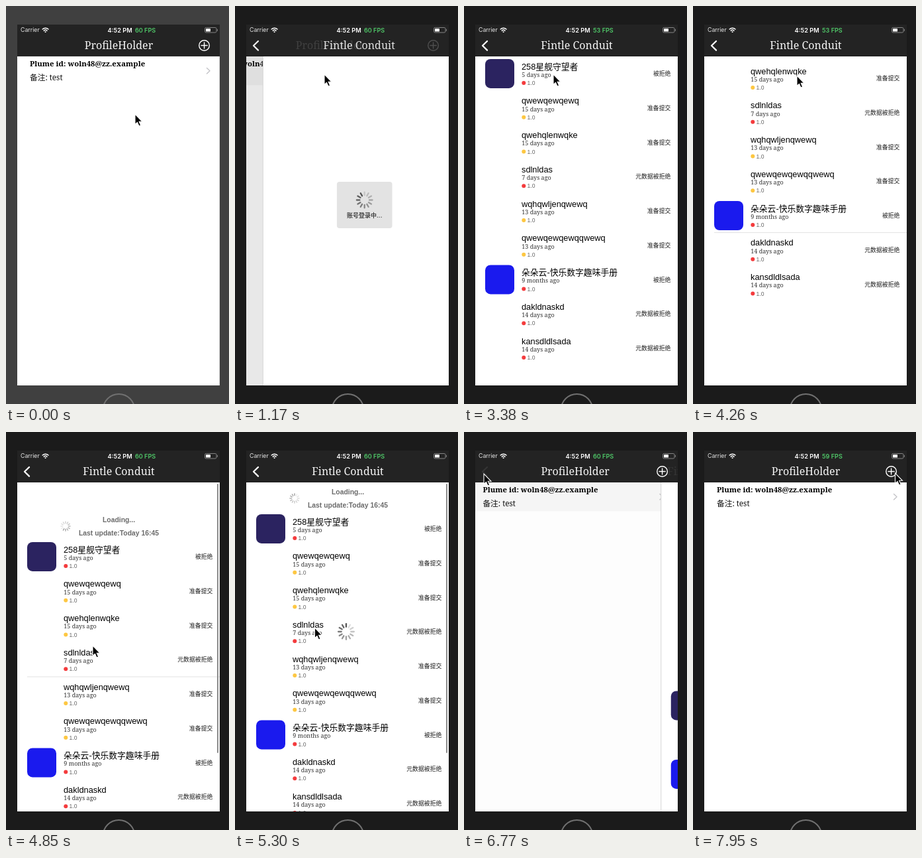
Recreate the animation shown at these times as an HTML page. Size 337 by 600 pixels, loop 8000 ms.

```html
<!DOCTYPE html>
<html lang="zh">
<head>
<meta charset="utf-8">
<title>Account list</title>
<style>
  html, body { margin: 0; width: 100%; height: 100%; overflow: hidden; background: #1b1b1b; }
  svg { display: block; }
  text { white-space: pre; }
  .slab { font-family: "Noto Serif", "Noto Sans CJK SC", serif; }
  .sans { font-family: "Liberation Sans", "Noto Sans CJK SC", sans-serif; }
  .ui { font-family: Inter, "Noto Sans CJK SC", sans-serif; }
  .mid { text-anchor: middle; }
  .end { text-anchor: end; }
  .line { fill: none; stroke-linecap: round; stroke-linejoin: round; }
</style>
</head>
<body>
<svg id="stage" width="337" height="600" viewBox="0 0 337 600">
  <clipPath id="screen"><rect x="17" y="28" width="306" height="544"/></clipPath>
  <rect id="desk" width="337" height="600"/>
  <circle cx="170.5" cy="609" r="24" fill="none" stroke="#707070" stroke-width="2"/>
  <g clip-path="url(#screen)">
    <g id="accounts">
      <rect x="17" y="76" width="306" height="496" fill="#fff"/>
      <rect id="press" x="17" y="76" width="306" height="43.5" fill="#f5f5f5"/>
      <text class="slab" x="36" y="91" font-size="11.4" font-weight="700">Plume id: woln48@zz.example</text>
      <text class="slab" x="36" y="112" font-size="11.7" fill="#111">备注: test</text>
      <path class="line" d="M303.5 93.5l4.5 4.3l-4.5 4.3" stroke="#c4c4c8" stroke-width="1.4"/>
    </g>
    <rect id="dim" x="17" y="76" width="306" height="496"/>
    <g id="apps">
      <rect x="17" y="76" width="306" height="496" fill="#fff"/>
      <path id="edge" d="M17 76V572" stroke="#d4d4d4"/>
      <g id="list">
        <g class="sans mid" font-size="10.4" font-weight="700" fill="#6b6b6b">
          <text id="hint" x="170.5" y="-26.2"></text>
          <text id="stamp" x="170.5" y="-6.2"></text>
        </g>
        <path id="rule" d="M32 0H323" stroke="#e2e2e2"/>
      </g>
      <rect id="bar" x="319" y="78" width="2" height="406" rx="1" fill="#8c8c8c"/>
      <g id="hud">
        <rect id="box" rx="4"/>
        <text id="label" class="ui mid" x="170.5" y="318.5" font-size="9" font-weight="600" fill="#444"></text>
      </g>
    </g>
    <rect x="17" y="28" width="306" height="47.6" fill="#232323"/>
    <g fill="#fff" class="ui">
      <text x="22" y="39.3" font-size="8.8" fill="#e4e4e4">Carrier</text>
      <path class="line" d="M55.2 35a6.4 6.4 0 0 1 8.8 0M57.2 37.2a3.5 3.5 0 0 1 4.8 0" stroke="#fff" stroke-width="1.5"/>
      <circle cx="59.6" cy="39" r="1.1"/>
      <text x="153.5" y="39.5" font-size="9.2" font-weight="600">4:52 PM</text>
      <text id="fps" x="195" y="39.5" font-size="9.1" font-weight="600" fill="#4fc768"></text>
      <rect x="300.5" y="32.5" width="17.5" height="7.5" rx="1.8" fill="none" stroke="#858585"/>
      <rect x="302" y="34" width="7" height="4.6" rx=".6"/>
      <path d="M319.4 34.8v3" stroke="#858585"/>
    </g>
    <g fill="#f4f4f4" class="slab mid" font-size="16">
      <text id="oldTitle" x="170.5" y="64.5">ProfileHolder</text>
      <text id="newTitle" x="170.5" y="64.5">Fintle Conduit</text>
    </g>
    <g id="add" class="line" stroke="#fff" stroke-width="1.4">
      <circle cx="299.6" cy="59.5" r="7.8"/>
      <path d="M295 59.5h9.2M299.6 54.9v9.2"/>
    </g>
    <path id="back" class="line" d="M35 53l-7 6.8l7 6.8" stroke="#fff" stroke-width="2.3"/>
  </g>
  <path id="pointer" d="M0 0V15.5L3.5 12.3L6 18L8.6 16.9L6.2 11.3H11Z" stroke="#fff" stroke-width="1.1"/>
</svg>
<script>
const LOOP = 8000, START = 286, TICK = 147.1;
const TOP = 76, PITCH = 51.75, WIDTH = 306;
const $ = id => document.getElementById(id);

function make(parent, tag, attrs, text) {
  const el = document.createElementNS('http://www.w3.org/2000/svg', tag);
  set(el, attrs);
  if (text) el.textContent = text;
  parent.appendChild(el);
  return el;
}
function set(el, attrs) {
  for (const k in attrs) el.setAttribute(k, attrs[k]);
}
const clamp = v => Math.max(0, Math.min(1, v));
const move = (el, x, y) => set(el, { transform: `translate(${x} ${y})` });
const fade = (el, a) => set(el, { opacity: clamp(a) });

// Easing from 0 to 1 between ticks a and b
const part = (n, a, b) => clamp((n - a) / (b - a));
const glide = (n, a, b) => { const u = part(n, a, b); return u * u * (3 - 2 * u); };
const settle = (n, a, b) => 1 - (1 - part(n, a, b)) ** 3.6;

// Pointer stops: [tick, x, y]
const STOPS = [[-1, 195, 163], [3, 135, 103], [22, 135, 103], [24, 164, 296], [27, 157, 105], [30, 135, 150],
  [31, 131, 322], [33, 131, 322], [38, 30, 63], [45, 30, 63], [48, 323, 65], [52, 305.5, 62]];

function pointerAt(n) {
  let [, x, y] = STOPS[0];
  for (let i = 1; i < STOPS.length; i++) {
    const f = glide(n, STOPS[i - 1][0], STOPS[i][0]);
    x += (STOPS[i][1] - STOPS[i - 1][1]) * f;
    y += (STOPS[i][2] - STOPS[i - 1][2]) * f;
  }
  return [x, y];
}

const pushAt = n => settle(n, 4, 8) - settle(n, 42, 46);
const pressAt = n => glide(n, 3, 4) - glide(n, 43, 46);
const hudAt = n => 1 - glide(n, 18, 20) + glide(n, 33, 34) - glide(n, 37, 41);

// Drag up and spring back, then pull to refresh, rest while loading, close
const pullAt = n => 96.4 * (settle(n, 27, 30) - glide(n, 24, 27))
  + 86 * glide(n, 30, 31) - 42 * glide(n, 31, 34) - 44 * glide(n, 38.2, 41);

function fpsAt(n) {
  if (n >= 45) return 59;
  if (n >= 29 || n < 14) return 60;
  return n < 20 ? 55 : 53;
}

const READY = '准备提交', META = '元数据被拒绝', REJECTED = '被拒绝';
const APPS = [
  ['258星舰守望者', '5 days', REJECTED, '#2b2360'],
  ['qwewqewqewq', '15 days', READY],
  ['qwehqlenwqke', '15 days', READY],
  ['sdlnldas', '7 days', META],
  ['wqhqwljenqwewq', '13 days', READY],
  ['qwewqewqewqqwewq', '13 days', READY],
  ['朵朵云-快乐数字趣味手册', '9 months', REJECTED, '#1a1aee'],
  ['dakldnaskd', '14 days', META],
  ['kansdldlsada', '14 days', META]
];
const FIRST = [...APPS.keys()], LATER = [3, 1, 5, 8, 7, 4, 0, 2, 6];

const rows = APPS.map(([name, age, state, icon]) => {
  const g = make($('list'), 'g', {});
  if (icon) make(g, 'rect', { x: 32, y: -22, width: 44, height: 44, rx: 8, fill: icon });
  make(g, 'text', { class: 'sans', x: 87, y: -6.3, 'font-size': 12.8 }, name);
  make(g, 'text', { class: 'slab', x: 87.3, y: 5, 'font-size': 9, fill: '#333' }, age + ' ago');
  make(g, 'circle', { cx: 90.3, cy: 14, r: 3, fill: state === READY ? '#fdc742' : '#f43b3d' });
  make(g, 'text', { class: 'sans', x: 95.5, y: 17.2, 'font-size': 8.6, fill: '#666' }, '1.0');
  make(g, 'text', { class: 'sans end', x: 312.5, y: 3.2, 'font-size': 8.9, fill: '#1c1c1c' }, state);
  return g;
});

function spinner(parent, r, width) {
  const g = make(parent, 'g', {});
  const blades = Array.from({ length: 12 }, (_, i) => make(g, 'path', {
    class: 'line', d: `M0 ${-r * .56}V${-r + width / 2}`, transform: `rotate(${i * 30})`,
    stroke: '#444', 'stroke-width': width
  }));
  return {
    g,
    turn(t) {
      const head = Math.floor(t * 12 / 1000) + 9;
      blades.forEach((b, i) => fade(b, .9 - (head - i + 24) % 12 * .065));
    }
  };
}
const hudSpin = spinner($('hud'), 13, 2.3);
const pullSpin = spinner($('list'), 7.8, 1.3);
move(pullSpin.g, 90, -20);

function drawNav(n, p) {
  const gone = 1 - p;
  $('fps').textContent = fpsAt(n) + ' FPS';
  move($('oldTitle'), -29.5 * p, 0);
  move($('newTitle'), 208 * gone, 0);
  fade($('oldTitle'), 1.6 * gone);
  fade($('add'), 2.4 * gone);
  fade($('newTitle'), p);
  fade($('back'), p);
}

function drawPages(n, p) {
  move($('accounts'), -.3 * WIDTH * p, 0);
  move($('apps'), WIDTH * (1 - p), 0);
  fade($('press'), pressAt(n));
  fade($('dim'), .1 * p);
  fade($('edge'), p < 1 ? 1 : 0);
}

function drawList(n, t) {
  const pull = pullAt(n), fresh = n >= 37, loading = n >= 31 && !fresh;
  move($('list'), 0, TOP + pull);
  fade($('list'), n < 19 ? 0 : 1);
  (fresh ? LATER : FIRST).forEach((id, i) => move(rows[id], 0, PITCH * (i + .5)));

  // One divider shows, the one nearest the middle of the screen
  move($('rule'), 0, Math.round(Math.round((355 - TOP - pull) / PITCH) * PITCH));
  fade($('rule'), n >= 25 && n < 33 ? 1 : 0);
  fade($('bar'), n >= 31 && n < 35 ? 1 : 0);

  $('hint').textContent = loading ? 'Loading...' : 'Pull down to refresh';
  $('stamp').textContent = 'Last update:Today 16:' + (fresh ? 52 : 45);
  fade(pullSpin.g, loading ? .6 : fresh ? .4 : 0);
  pullSpin.turn(t);
}

function drawHud(n, t) {
  const label = n < 12 ? '账号登录中...' : n < 30 ? 'Apps状态查询中' : '';
  const w = label ? 30 + $('label').getComputedTextLength() : 62, h = label ? 70 : 62;
  $('label').textContent = label;
  set($('box'), { x: 170.5 - w / 2, y: 300 - h / 2, width: w, height: h, fill: label ? '#e3e3e3' : '#fff' });
  move(hudSpin.g, label ? 170.5 : 168, label ? 292.5 : 301);
  hudSpin.turn(t);
  fade($('hud'), hudAt(n));
}

function draw(time) {
  const n = Math.floor((time - START) / TICK), t = START + n * TICK, p = pushAt(n);
  $('desk').setAttribute('fill', n < 3 ? '#404040' : '#1b1b1b');
  move($('pointer'), ...pointerAt(n));
  drawNav(n, p);
  drawPages(n, p);
  drawList(n, t);
  drawHud(n, t);
}

function loop() {
  draw(performance.now() % LOOP);
  requestAnimationFrame(loop);
}
loop();
</script>
</body>
</html>
```
